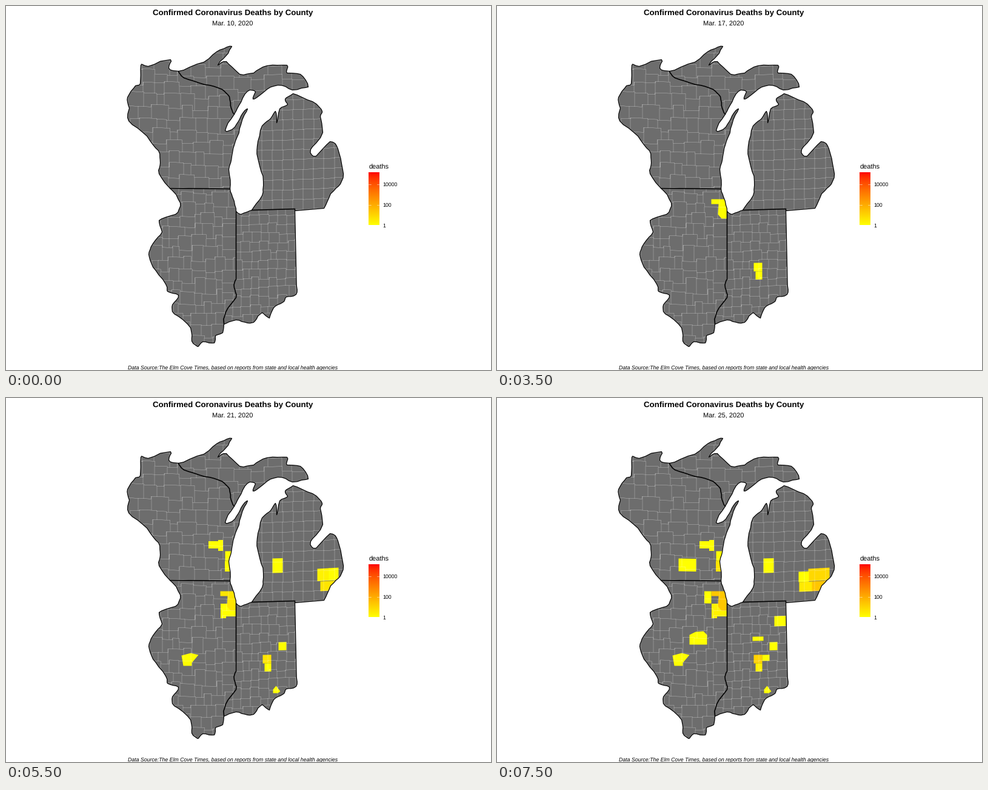
A matplotlib script for the animation above (8 s loop, 800 by 600 pixels).

```python
import numpy as np
import matplotlib.pyplot as plt
from matplotlib.animation import FuncAnimation
from matplotlib.collections import LineCollection
from matplotlib.patches import Polygon

plt.rcParams["font.family"] = "Liberation Sans"
plt.rcParams["text.hinting"] = "none"

PX = 0.72  # points per pixel at 100 dpi
CENTER = 373.5
FIRST_DAY, LAST_DAY = 10, 25
GREY = "#6d6d6d"
rng = np.random.default_rng(7)

fig = plt.figure(figsize=(8, 6), dpi=100, facecolor="white")
ax = fig.add_axes([0, 0, 1, 1])
ax.axis("off")


# ---- colour scale: yellow to red through Lab, over log10(deaths) ----
YELLOW = np.array([97.14, -21.55, 94.48])
RED = np.array([53.24, 80.09, 67.20])
XYZ_TO_RGB = np.array([[3.2406, -1.5372, -0.4986],
                       [-0.9689, 1.8758, 0.0415],
                       [0.0557, -0.2040, 1.0570]])


def ramp(t):
    L, a, b = (YELLOW + np.atleast_1d(t)[:, None] * (RED - YELLOW)).T
    fy = (L + 16) / 116
    f = np.stack([fy + a / 500, fy, fy - b / 200], -1)
    xyz = np.where(f > 6 / 29, f ** 3, (f - 4 / 29) * 108 / 841)
    lin = np.clip(xyz * [0.9505, 1.0, 1.089] @ XYZ_TO_RGB.T, 0, 1)
    rgb = np.where(lin > 0.0031308, 1.055 * lin ** (1 / 2.4) - 0.055, 12.92 * lin)
    return np.clip(rgb, 0, 1) ** (2.2 / 1.8)  # display gamma


def shade(deaths):
    return ramp(np.log10(deaths) / 5.07)[0]


# ---- borders: key points, refined by four-point subdivision ----
def coast(*pts, wiggle=0.06):
    p = np.array(pts, float)
    for _ in range(2):
        ext = np.vstack([p[:1], p, p[-1:]])
        mid = (p[:-1] + p[1:]) * 9 / 16 - (ext[:-3] + ext[3:]) / 16
        size = np.hypot(*np.diff(p, axis=0).T)[:, None]
        mid += wiggle * size * rng.uniform(-1, 1, mid.shape)
        p = np.vstack([np.stack([p[:-1], mid], 1).reshape(-1, 2), p[-1:]])
    return p


def line(*pts):
    return np.array(pts, float)


wi_west = coast(
    (270, 300), (252, 276), (254, 258), (251, 238), (232, 214), (202, 189),
    (203, 168), (200, 150), (213, 131), (221, 127), (222, 97), (234, 99),
    (271, 88), (268, 102), (284, 107))
wi_mi = coast((284, 107), (293, 118), (327, 129), (356, 137), (368, 149),
              (371, 168), (376, 178))
wi_east = coast((376, 178), (361, 205), (377, 199), (387, 181), (398, 169),
                (387, 195), (378, 222), (372, 247), (367, 269), (369, 301))
wi_il = line((270, 300), (369, 301))
il_shore = coast((369, 301), (373, 314), (379, 338))
il_in = np.vstack([line((379, 338)), coast(
    (379, 450), (376, 464), (379, 480), (362, 504), (359, 524))])
il_west = coast(
    (359, 524), (357, 538), (345, 543), (343, 555), (324, 553), (316, 561),
    (306, 552), (304, 530), (277, 507), (274, 492), (284, 476), (266, 470),
    (263, 458), (242, 430), (235, 409), (242, 391), (257, 372), (252, 353),
    (279, 343), (287, 324), (270, 300))
in_shore = coast((379, 338), (387, 343), (405, 336))
in_mi = line((405, 336), (476, 334))
in_south = np.vstack([line((476, 334)), coast(
    (478.7, 460), (478, 475), (462, 479), (456, 488), (441, 497), (434, 514),
    (422, 505), (410, 519), (398, 522), (379, 517), (359, 524))])
lp_west = coast(
    (405, 336), (422, 312), (424, 288), (416, 255), (414, 230), (422, 197),
    (436, 185), (444, 173), (446, 192), (451, 169), (464, 162), (460, 153),
    (473, 144))
lp_east = np.vstack([coast(
    (473, 144), (505, 157), (521, 173), (518, 182), (522, 208), (502, 236),
    (511, 247), (534, 223), (547, 235), (555, 270), (551, 293), (535, 309),
    (524, 333)), line((476, 337), (476, 334))])
up_north = coast(
    (284, 107), (326, 92), (352, 72), (372, 66), (362, 82), (349, 97),
    (363, 91), (385, 112), (408, 110), (430, 98), (463, 97), (463, 110),
    (485, 112), (498, 133))
up_south = coast(
    (498, 133), (472, 138), (448, 130), (424, 142), (407, 153), (411, 141),
    (398, 140), (384, 163), (376, 178))


def add_state(*arcs):
    return ax.add_patch(Polygon(np.vstack(arcs), fc=GREY, ec="none", zorder=1))


WI = add_state(wi_west, wi_mi, wi_east, wi_il[::-1])
IL = add_state(il_shore, il_in, il_west, wi_il)
IN = add_state(in_shore, in_mi, in_south, il_in[::-1])
LP = add_state(lp_west, lp_east, in_mi[::-1])
UP = add_state(up_north, up_south, wi_mi[::-1])


def stroke(arcs, width):
    ax.add_collection(LineCollection(arcs, colors="black", linewidths=width * PX,
                                     joinstyle="round", capstyle="round", zorder=4))


stroke([wi_west, wi_east, il_shore, il_west, in_shore, in_south,
        lp_west, lp_east, up_north, up_south], 1.2)
stroke([wi_mi, wi_il, il_in, in_mi], 1.6)


# ---- county lines: a jogged brick pattern that follows the parallels ----
def bow(x):
    return -1.7e-4 * (x - CENTER) ** 2


def add_grid(state, width, height, jog):
    (x0, y0), (x1, y1) = state.get_xy().min(0), state.get_xy().max(0)
    cols = np.arange(x0, x1 + 2 * width, width)
    prev_x, prev_y = cols[[0, -1]], np.full(2, y1 + height)
    lines = []
    for y in np.arange(y1, y0 - 2 * height, -height):
        xs = cols + jog * width * rng.uniform(-1, 1, len(cols))
        levels = y + jog * height * rng.uniform(-1, 1, len(cols) - 1)
        step_x, step_y = np.repeat(xs, 2)[1:-1], np.repeat(levels, 2)
        lines.append(np.column_stack([step_x, step_y + bow(step_x)]))
        for x, top in zip(xs, levels):
            ends = np.array([top, np.interp(x, prev_x, prev_y)])
            lines.append(np.column_stack([[x, x], ends + bow(x)]))
        prev_x, prev_y = step_x, step_y
    grid = LineCollection(lines, colors="white", linewidths=0.25 * PX, zorder=3)
    ax.add_collection(grid)
    grid.set_clip_path(state)


add_grid(WI, 22, 19, 0.25)
add_grid(IL, 18, 18, 0.3)
add_grid(IN, 15, 15, 0.2)
add_grid(LP, 17, 16.5, 0.03)
add_grid(UP, 24, 20, 0.25)


# ---- counties with deaths ----
counties = []


def county(state, first, total, *pts):
    """Two points give the corners of a box; the count grows to total."""
    if len(pts) == 2:
        (x0, y0), (x1, y1) = pts
        tilt = bow(x1) - bow(x0)
        pts = [(x0, y0), (x1, y0 + tilt), (x1, y1 + tilt), (x0, y1)]
    patch = ax.add_patch(Polygon(pts, ec="none", visible=False, zorder=2))
    patch.set_clip_path(state)
    counties.append((patch, first, total))


def count(day, first, total):
    if day < first:
        return 0
    return round(total ** ((day - first) / max(LAST_DAY - first, 1)))


county(IN, 16, 11, (423, 423), (437, 437))
county(IN, 17, 2, (426, 437), (437, 450.5))
county(IN, 20, 1, (449, 402), (462, 415.5))
county(IN, 21, 1, (440, 480), (445, 474), (452, 483), (448, 486), (440, 486))
county(IN, 23, 1, (457, 359), (476, 376))
county(IN, 25, 1, (421, 393), (439, 400))
county(IN, 25, 1, (437, 423), (449, 433))

county(IL, 19, 2, (353, 338), (379, 338), (379, 359), (362, 359), (362, 362), (353, 362))
county(IL, 17, 20, (353, 318), (380, 318), (380, 350), (370, 350), (364, 343),
       (365, 326), (353, 326))
county(IL, 19, 1, (289, 424), (304, 420), (317, 423), (306, 436), (306, 441), (292, 441))
county(IL, 22, 1, (317, 390), (327, 385), (340, 384), (346, 390), (346, 406), (317, 406))
county(IL, 25, 1, (341.5, 318), (353, 338))

county(WI, 19, 1, (333, 235.5), (349, 235.5), (349, 233), (357, 233), (357, 251),
       (349, 251), (349, 247.5), (333, 247.5))
county(WI, 19, 1, (361, 252), (376, 268))
county(WI, 20, 4, (360.5, 268), (376, 285.5))
county(WI, 25, 1, (299, 264), (328, 285))

county(LP, 18, 21, (518, 302), (548, 318))
county(LP, 20, 8, (513, 281), (533, 301.5))
county(LP, 20, 7, (532, 280), (548, 300.5))
county(LP, 22, 3, (498, 303), (519, 319))
county(LP, 21, 1, (439, 264), (456, 288))
county(LP, 25, 1, (497, 286), (514, 303))


# ---- text and legend ----
def label(x, y, text, size, **kw):
    return ax.text(x, y, text, fontsize=size * PX, va="baseline", color="black", **kw)


label(CENTER, 15, "Confirmed Coronavirus Deaths by County", 13.2, ha="center", weight="bold")
date = label(CENTER, 32, "", 11, ha="center")
label(CENTER, 599, "Data Source:The Elm Cove Times, based on reports from state and local "
      "health agencies", 8.8, ha="center", style="italic")

LEFT, RIGHT, TOP, BOTTOM = 597.5, 615, 274.5, 361
label(598, 268, "deaths", 11)
ax.imshow(ramp(np.linspace(1, 0, 300))[:, None], aspect="auto",
          extent=(LEFT, RIGHT, BOTTOM, TOP), zorder=1)
for power in (0, 2, 4):
    y = BOTTOM - 17 * power
    label(620.8, y + 3.2, str(10 ** power), 8.8)
    for x in (LEFT, RIGHT - 3.5):
        ax.plot([x, x + 3.5], [y, y], color="white", lw=0.5 * PX, zorder=2)

ax.set_xlim(-0.5, 799.5)
ax.set_ylim(599.5, -0.5)


def update(i):
    day = FIRST_DAY + i
    date.set_text(f"Mar. {day}, 2020")
    for patch, first, total in counties:
        deaths = count(day, first, total)
        patch.set_visible(deaths > 0)
        if deaths:
            patch.set_facecolor(shade(deaths))
    return []


anim = FuncAnimation(fig, update, frames=LAST_DAY - FIRST_DAY + 1, interval=500,
                     repeat=True, repeat_delay=0)
plt.show()
```
